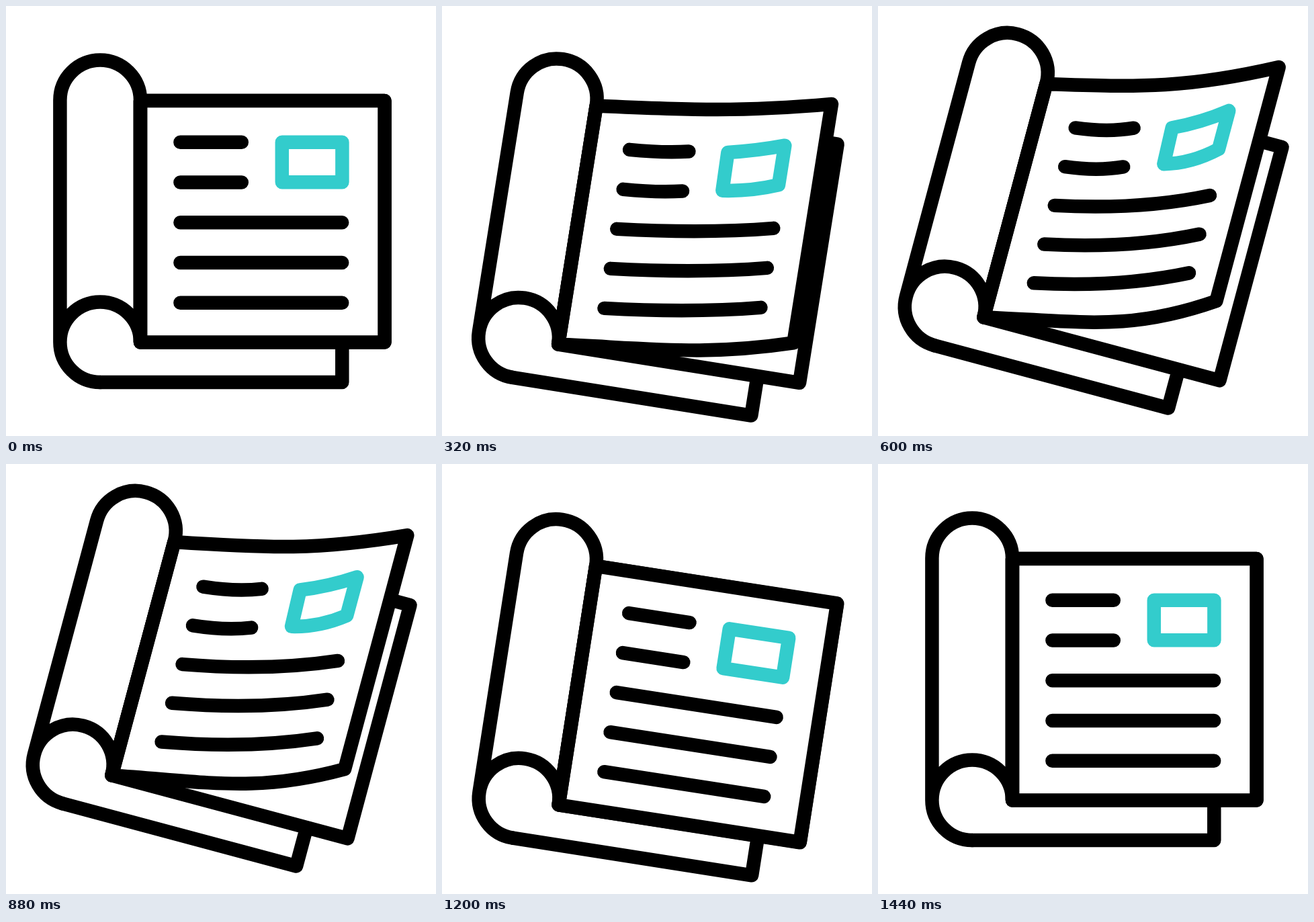
An HTML page with a canvas that plays this animation: 640 by 640 pixels, repeating every 1480 ms.

```html
<!DOCTYPE html>
<html lang="en">
<head>
<meta charset="utf-8">
<title>Newspaper</title>
<style>
  html, body { margin: 0; width: 100%; height: 100%; overflow: hidden; background: #fff; }
  canvas { display: block; width: 100vmin; height: 100vmin; }
</style>
</head>
<body>
<canvas id="stage" width="640" height="640"></canvas>
<script>
const ctx = document.getElementById('stage').getContext('2d');
const LOOP = 1480, STEP = 40;
const INK = '#000', TEAL = '#33cccc';
const HINGE = 200, RIGHT = 563.5, TOP = 141, BOTTOM = 500.6;
const ROLL = { x: 140.2, r: 59.8, top: 140.2, bottom: 500.2 };

const clamp = v => Math.min(1, Math.max(0, v));
const smooth = u => u * u * (3 - 2 * u);

// Cubic-bezier easing (x1, 0, x2, 1), solved by bisection.
function ease(x, x1 = 0.4, x2 = 0.43) {
  if (x <= 0 || x >= 1) return clamp(x);
  let lo = 0, hi = 1;
  for (let i = 0; i < 24; i++) {
    const p = (lo + hi) / 2, q = 1 - p;
    if (3 * q * q * p * x1 + 3 * q * p * p * x2 + p * p * p < x) lo = p; else hi = p;
  }
  return smooth(lo);
}

function pose(t) {
  const opening = t < 700;
  const turn = smooth(clamp(opening ? (t - 116) / 358 : (1401 - t) / 358));
  const lift = opening ? ease((t - 100) / 500) : 1 - ease((t - 780) / 450);
  const dip = 4 * turn * (1 - turn) * (opening ? 29.9 - 7.7 * turn : 28.3);
  return { turn, lift, dip };
}

function stroke(color = INK) {
  ctx.strokeStyle = color;
  ctx.stroke();
}

function drawBack() {
  ctx.beginPath();
  ctx.rect(HINGE, TOP, RIGHT - HINGE, BOTTOM - TOP);
  ctx.moveTo(500.3, BOTTOM);
  ctx.lineTo(500.3, 560);
  ctx.lineTo(ROLL.x, 560);
  stroke();
}

function drawRoll() {
  const { x, r, top, bottom } = ROLL;
  ctx.beginPath();
  ctx.moveTo(x - r, bottom);
  ctx.lineTo(x - r, top);
  ctx.arc(x, top, r, Math.PI, 0);
  ctx.lineTo(x + r, BOTTOM);
  ctx.moveTo(x + r, bottom);
  ctx.arc(x, bottom, r, 0, Math.PI / 2, true);
  stroke();
}

function drawPage(lift) {
  // Resting point plus its displacement when the page is fully lifted.
  const at = (x, y, dx, dy) => [x + dx * lift, y + dy * lift];

  ctx.beginPath();
  ctx.moveTo(HINGE, TOP);
  ctx.bezierCurveTo(...at(348, TOP, -8, -32), ...at(425, TOP, -17, -50),
    ...at(RIGHT, TOP, -35.5, -113.8));
  ctx.lineTo(...at(RIGHT, BOTTOM, -35.5, -113));
  ctx.bezierCurveTo(...at(425, BOTTOM, -12, -34.5), ...at(348, BOTTOM, -8, -32),
    HINGE, BOTTOM);
  ctx.closePath();
  ctx.fillStyle = '#fff';
  ctx.fill();
  stroke();

  ctx.beginPath();
  for (let row = 0; row < 5; row++) {
    const y = 202.7 + 59.75 * row;
    ctx.moveTo(...at(259.4, y, -0.7, -9.7));
    if (row < 2) ctx.quadraticCurveTo(...at(312, y, -5, -15.5), ...at(350.8, y, -8, -32));
    else ctx.quadraticCurveTo(...at(392, y, -8, -36), ...at(500.2, y, -22, -84));
  }
  stroke();

  ctx.beginPath();
  ctx.moveTo(...at(410.8, 202.8, -13, -47.3));
  ctx.quadraticCurveTo(...at(456, 202.8, -19, -65.5), ...at(500.4, 202.8, -27.5, -93.7));
  ctx.lineTo(...at(500.4, 262.3, -27.5, -94));
  ctx.quadraticCurveTo(...at(456, 262.3, -17, -62.5), ...at(410.8, 262.3, -11, -51.5));
  ctx.closePath();
  stroke(TEAL);
}

function draw(now) {
  const t = Math.floor((now % LOOP) / STEP) * STEP;
  const { turn, lift, dip } = pose(t);
  ctx.setTransform(1, 0, 0, 1, 0, 0);
  ctx.fillStyle = '#fff';
  ctx.fillRect(0, 0, 640, 640);
  ctx.lineWidth = 20.5;
  ctx.lineCap = ctx.lineJoin = 'round';
  ctx.translate(320, 320 + dip);
  ctx.rotate(turn * Math.PI / 12);
  ctx.translate(-320, -320);
  drawBack();
  drawPage(lift);
  drawRoll();
}

const start = performance.now();
function tick() {
  draw(performance.now() - start);
  requestAnimationFrame(tick);
}
tick();
</script>
</body>
</html>
```
